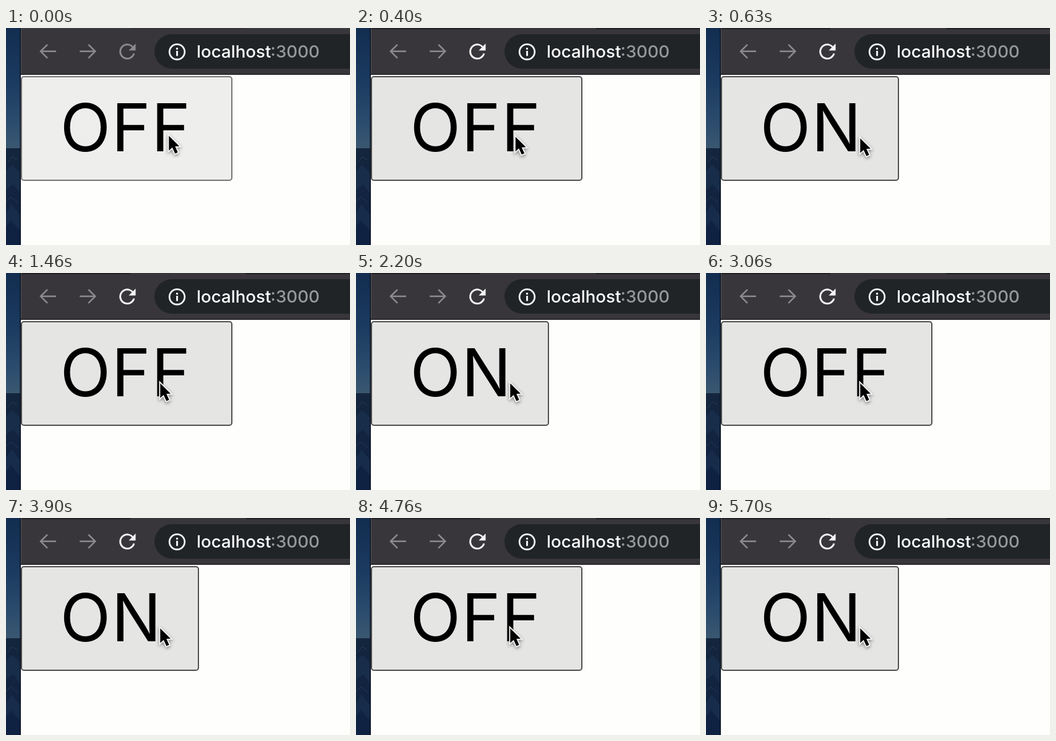
An HTML page with a canvas for the animation above (6.6 s loop, 556 px wide and 352 px high).

```html
<!DOCTYPE html>
<html lang="en">
<head>
<meta charset="utf-8">
<title>Toggle</title>
<style>
  html, body { margin: 0; width: 100%; height: 100%; overflow: hidden; background: #fefefd; }
  canvas { display: block; }
</style>
</head>
<body>
<canvas id="stage" width="556" height="352"></canvas>
<script>
const ctx = document.getElementById('stage').getContext('2d');
const LOOP = 6600;
const GREY = '#8b898d';
const LIGHT = '#f4f4f5';

// Mouse down and mouse up times; each release flips the label.
const CLICKS = [[560, 630], [1360, 1460], [2130, 2200], [3000, 3060],
                [3800, 3900], [4660, 4760], [5560, 5700]];
const MOVE = { start: 300, end: 540, steps: 7, from: [262.5, 174], to: [248.5, 178] };
const LOOKS = {
  idle: ['#eeeeed', '#767676'],
  hover: ['#e5e5e4', '#4f4f4f'],
  active: ['#f5f5f4', '#8d8d8d']
};

function rect(x, y, w, h, color) {
  ctx.fillStyle = color;
  ctx.fillRect(x, y, w, h);
}

function trace(points, close) {
  ctx.beginPath();
  points.forEach(([x, y]) => ctx.lineTo(x, y));
  if (close) ctx.closePath();
}

function fillShape(points, color) {
  trace(points, true);
  ctx.fillStyle = color;
  ctx.fill();
}

function strokeLine(points, color, width) {
  trace(points);
  ctx.strokeStyle = color;
  ctx.lineWidth = width;
  ctx.stroke();
}

function text(str, x, y, font, color, spacing = 0) {
  ctx.font = font;
  ctx.letterSpacing = spacing + 'px';
  ctx.fillStyle = color;
  ctx.fillText(str, x, y);
}

function desktop() {
  const sky = ctx.createLinearGradient(0, 0, 0, 196);
  [[0, '#122d50'], [0.45, '#1b3b60'], [0.8, '#2c4d6e'], [1, '#3b5871']]
    .forEach(s => sky.addColorStop(...s));
  rect(0, 0, 24, 196, sky);
  const land = ctx.createLinearGradient(0, 196, 0, 352);
  land.addColorStop(0, '#14263d');
  land.addColorStop(1, '#0f2142');
  rect(0, 195, 24, 157, land);
  fillShape([[0, 232], [10, 222], [24, 236], [24, 270], [12, 254], [0, 262]], '#182d49');
  fillShape([[0, 300], [9, 286], [24, 305], [24, 330], [8, 312], [0, 322]], '#172c4b');
  strokeLine([[2, 219], [10, 209], [18, 214]], '#263b54', 1);
  strokeLine([[0, 281], [8, 274], [20, 284]], '#233953', 1);
  rect(22.5, 0, 1.5, 352, '#0b1220');
}

function navArrow(tip, dir) {
  strokeLine([[tip, 37.8], [tip + dir * 25, 37.8]], GREY, 2.6);
  strokeLine([[tip + dir * 11, 26.8], [tip, 37.8], [tip + dir * 11, 48.8]], GREY, 2.6);
}

function reloadIcon(color) {
  const x = 196, y = 38.2;
  ctx.beginPath();
  ctx.arc(x, y, 11.4, 0.28, Math.PI * 2 - 0.75);
  ctx.strokeStyle = color;
  ctx.lineWidth = 2.8;
  ctx.stroke();
  fillShape([[x + 13.5, y - 13], [x + 13.5, y - 1.8], [x + 2.4, y - 1.8]], color);
}

function infoIcon() {
  ctx.beginPath();
  ctx.arc(276.5, 38.7, 12.3, 0, Math.PI * 2);
  ctx.strokeStyle = '#f0f1f2';
  ctx.lineWidth = 2.8;
  ctx.stroke();
  rect(275, 32, 3, 3, '#f0f1f2');
  rect(275, 37, 3, 8.4, '#f0f1f2');
}

function toolbar(loaded) {
  const strip = loaded ? '#212024' : '#3d3d40';
  rect(24, 0, 532, 76, '#38363b');
  rect(24, 0, 177, 2, strip);
  rect(388, 0, 168, 2, strip);
  rect(24, 74.5, 532, 1.5, '#232226');
  rect(24, 0, 1, 74, '#59575c');
  navArrow(56, 1);
  navArrow(144.2, -1);
  reloadIcon(loaded ? LIGHT : GREY);
  ctx.beginPath();
  ctx.roundRect(240, 10, 360, 56, 28);
  ctx.fillStyle = '#202427';
  ctx.fill();
  infoIcon();
  const font = '500 27.7px Inter, sans-serif';
  text('localhost', 308, 48, font, '#ffffff');
  text(':3000', 427.5, 48, font, '#96989b');
}

function button(label, look) {
  const [fill, border] = LOOKS[look];
  ctx.beginPath();
  ctx.roundRect(25, 79, label === 'ON' ? 286 : 340, 168, 4);
  ctx.fillStyle = fill;
  ctx.fill();
  ctx.strokeStyle = border;
  ctx.lineWidth = 2;
  ctx.stroke();
  text(label, 87.5, 200, '106.67px Inter, sans-serif', '#000', 1.5);
}

function pointer(x, y) {
  const shape = [[0, 0], [0, 26], [6, 20.5], [11, 31.5], [15.8, 29.4], [11, 18.8], [18.5, 18.4]];
  ctx.save();
  ctx.translate(x + 0.8, y + 1);
  ctx.scale(0.91, 0.91);
  ctx.save();
  trace(shape, true);
  ctx.miterLimit = 3;
  ctx.lineWidth = 4;
  ctx.strokeStyle = '#f6f6f6';
  ctx.shadowColor = 'rgba(0,0,0,0.45)';
  ctx.shadowBlur = 5;
  ctx.shadowOffsetY = 2;
  ctx.stroke();
  ctx.restore();
  fillShape(shape, '#000');
  ctx.restore();
}

function pointerAt(t) {
  const { start, end, steps, from, to } = MOVE;
  if (t < start) return from;
  const span = (end - start) / (steps - 1);
  const p = Math.min(1, (Math.floor((t - start) / span) + 1) / steps);
  const ease = p * p * (3 - 2 * p);
  return from.map((v, i) => v + (to[i] - v) * ease);
}

function draw(t) {
  const flips = CLICKS.filter(([, up]) => t >= up).length;
  const pressed = CLICKS.some(([down, up]) => t >= down && t < up);
  const look = pressed ? 'active' : t >= MOVE.start ? 'hover' : 'idle';
  rect(0, 0, 556, 352, '#fefefd');
  desktop();
  toolbar(t >= 60);
  button(flips % 2 ? 'ON' : 'OFF', look);
  pointer(...pointerAt(t));
}

const began = performance.now();
function tick() {
  draw((performance.now() - began) % LOOP);
  requestAnimationFrame(tick);
}
tick();
</script>
</body>
</html>
```
